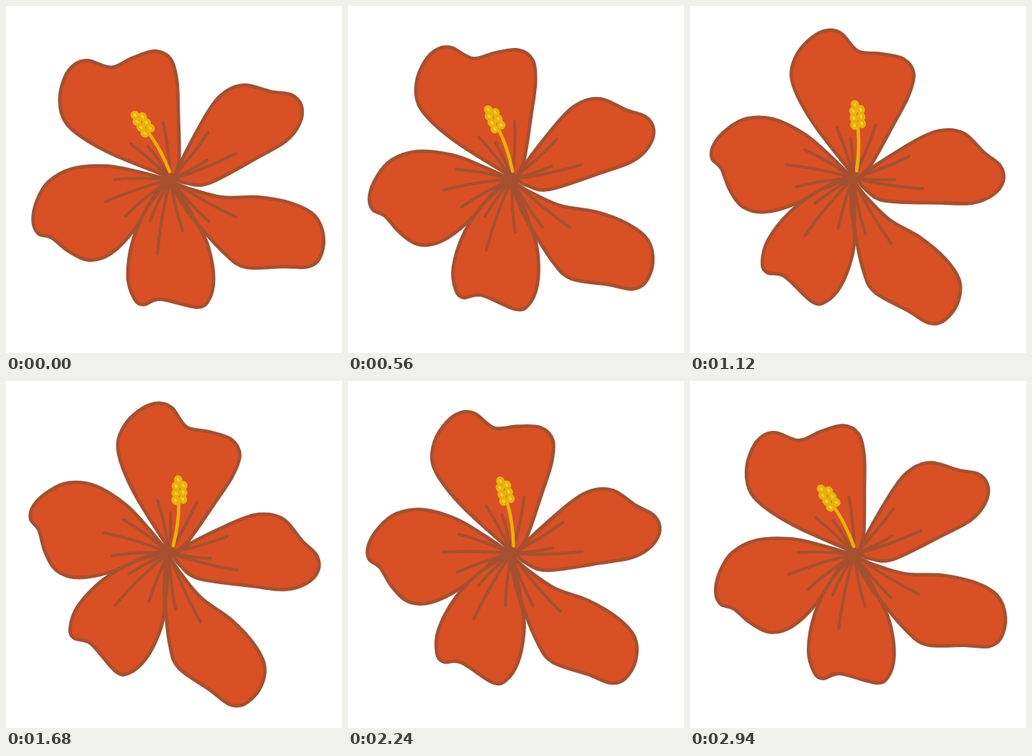
Recreate the animation shown at these times as an HTML page. Size 466 by 480 pixels, loop 3080 ms.

```html
<!DOCTYPE html>
<html lang="en">
<head>
<meta charset="utf-8">
<title>Swaying flower</title>
<style>
  html, body { margin: 0; width: 100%; height: 100%; overflow: hidden; background: #fff; }
  svg { display: block; width: 466px; height: 480px; }
  .petal { fill: #d95024; stroke: #a65030; stroke-width: 4.8; stroke-linejoin: round; }
  .vein { fill: none; stroke: #a65030; stroke-width: 4.2; stroke-linecap: round; }
  .heart { fill: #a65030; }
  .stem { fill: none; stroke: #eab10a; stroke-width: 4.6; stroke-linecap: round; }
  .bud { fill: #eab108; }
  .shine { fill: #f5cd3c; }
</style>
</head>
<body>
<svg viewBox="0 0 466 480" xmlns="http://www.w3.org/2000/svg">
  <g id="flower"></g>
</svg>
<script>
const HEART = [228, 240];
const PIVOT = [231, 236];
const STEP = 140;   // ms each pose is held
const HALF = 11;    // poses from one end of the sway to the other

// Each petal: key points of its edge, then the tips of its veins
const petals = {
  left: ['222,239 182,229 140,221.5 92,225 59,243 43,269 37.5,297 45,315 63,320.5 88,340 116,351.5 146,342 178,309 206,262 222,240',
    '150,240 138,271 166,290'],
  bottom: ['224,243 196,279 176,324 169,374 178,405 191,413 214,405.5 264,416.5 281,407 288,378 282,338 270,309 250,282 226,244',
    '200,297 210,343 245,311'],
  lowerRight: ['229,242 252,252 300,264.5 350,264.5 396,273 428,290 440.5,320 435,349 418,361 385,360.5 333,361.5 305,344 266,301 254,281 229,242',
    '281,298 319,292'],
  upperRight: ['236,238 245,211 281,145 304,119 331,109.5 368,118.5 396,123 410,139 407,163 388,187 350,209 282,245 250,245 236,240',
    '319,204 279,213 280,175'],
  top: ['230,238 150,206 106,182 82,160 74.5,131 81,100 95,81 114,75.5 146,85 175,72 206,62.5 228,73 237,103 239,150 240,212 233,238',
    '218,161 197,194 173,191']
};

const parse = s => s.split(' ').map(p => p.split(',').map(Number));
const clamp = (v, lo, hi) => Math.max(lo, Math.min(hi, v));

// Smooth curve through every point, with a sharp end at the heart
function spline(pts) {
  const at = i => pts[clamp(i, 0, pts.length - 1)];
  let d = 'M' + pts[0];
  for (let i = 0; i < pts.length - 1; i++) {
    const [a, b, c, e] = [at(i - 1), at(i), at(i + 1), at(i + 2)];
    const c1 = b.map((v, j) => v + (c[j] - a[j]) / 6);
    const c2 = c.map((v, j) => v - (e[j] - b[j]) / 6);
    d += `C${c1} ${c2} ${c}`;
  }
  return d + 'Z';
}

// Every vein curls slightly clockwise on its way out of the heart
function vein([x, y]) {
  const dx = (x - HEART[0]) / 2, dy = (y - HEART[1]) / 2, curl = 0.09;
  const bend = [HEART[0] + dx - dy * curl, HEART[1] + dy + dx * curl];
  return `<path class="vein" d="M${HEART}Q${bend} ${x} ${y}"/>`;
}

const oval = (cls, [x, y], rx, ry) =>
  `<ellipse class="${cls}" cx="${x}" cy="${y}" rx="${rx}" ry="${ry}" transform="rotate(35 ${x} ${y})"/>`;

// One bud at the tip, then three rows of two
const buds = [[179, 151]];
for (let row = 0; row < 3; row++)
  for (const side of [-1, 1])
    buds.push([185.5 + 5.5 * row + 3.8 * side, 156.5 + 8 * row - 3.5 * side]);

const parts = Object.values(petals);
const flower = document.getElementById('flower');
flower.innerHTML = [
  ...parts.map(([edge]) => `<path class="petal" d="${spline(parse(edge))}"/>`),
  ...parts.flatMap(([, tips]) => parse(tips).map(vein)),
  oval('heart', [226, 239], 11, 9),
  '<path class="stem" d="M227 229Q215 199 199 177"/>',
  ...buds.map(p => oval('bud', p, 6.4, 5.8)),
  ...buds.map(p => oval('shine', p, 2.7, 1.8))
].join('');

// Slow at both ends, faster through the middle of the sway
const sway = k => 1.95 * k + 3.1 * clamp(k - 3.3, 0, 5.3);

function draw() {
  const pose = Math.floor(performance.now() / STEP) % (2 * HALF);
  const k = HALF - Math.abs(HALF - pose);
  flower.setAttribute('transform', `rotate(${sway(k)} ${PIVOT})`);
  requestAnimationFrame(draw);
}
draw();
</script>
</body>
</html>
```
